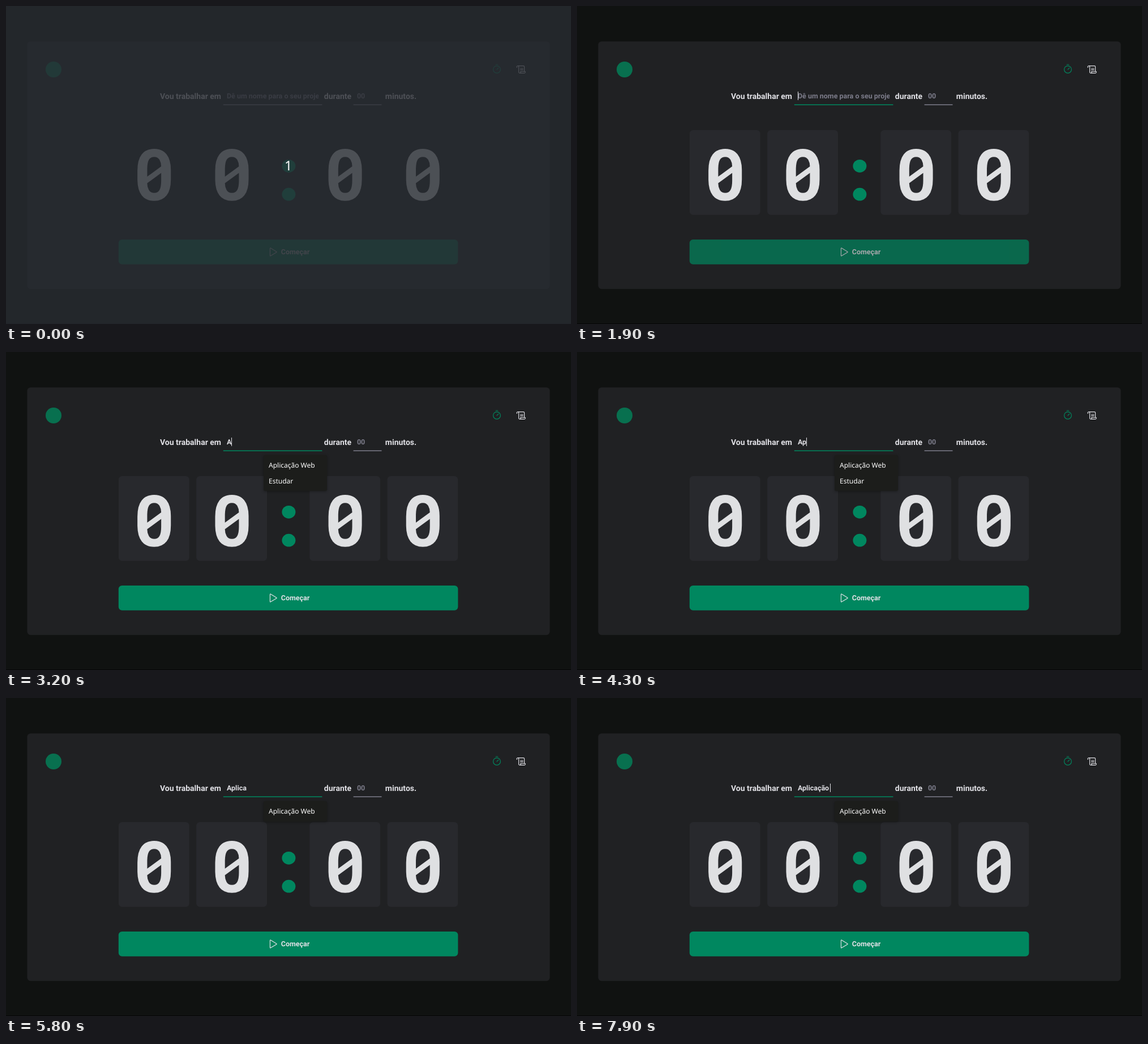
An HTML page that plays this animation: 998 by 561 pixels, repeating every 8 s.

```html
<!DOCTYPE html>
<html lang="pt-BR">
<head>
<meta charset="utf-8">
<title>Timer</title>
<style>
  html, body { margin: 0; width: 100%; height: 100%; overflow: hidden; background: #101211; }
  svg { display: block; width: 998px; height: 561px; }
  text { font: bold 12.48px Roboto, sans-serif; fill: #e1e1e6; white-space: pre; text-rendering: geometricPrecision; }
  .label { font-size: 14.03px; }
  .hint { fill: #7c7c8a; }
  .menu text { font: 12px "Noto Sans", sans-serif; fill: #fff; }
  .menu rect { filter: drop-shadow(0 1px 2px rgba(0, 0, 0, .35)); }
  .icon { fill: none; stroke: #e1e1e6; stroke-width: 16; stroke-linecap: round; stroke-linejoin: round; }
  .green { fill: #00875f; }
  .line { fill: #7c7c8a; }
  .focus { fill: #00875f; }
  .count { font: 23.5px "Noto Sans", sans-serif; fill: #fff; text-anchor: middle; }
</style>
</head>
<body>
<svg viewBox="0 0 998 561">
  <defs>
    <clipPath id="field"><rect x="390" y="145" width="162.2" height="26"/></clipPath>
    <g id="card">
      <rect id="plate" width="124.8" height="149.5" rx="6.2" fill="#28292d"/>
      <path transform="translate(27.8 123.6) scale(.0593 -.0613)" fill="#dfe0e2" fill-rule="evenodd"
        d="M1088 603Q1088 298 962 139T591 -20Q349 -20 222 136T92 583V852Q92 1162 220 1319T589 1476Q831 1476 958 1321T1088 873Z
           M383 678V917Q387 1087 436 1167T589 1247Q700 1247 750 1163T800 973Z
           M800 785V562Q800 383 750 296T591 209Q481 209 431 296T383 489Z"/>
    </g>
  </defs>

  <rect width="998" height="561" fill="#101211"/>
  <rect y="560" width="998" height="1" fill="#050606"/>
  <rect x="37.4" y="62.4" width="923.2" height="436.8" rx="6.2" fill="#202123"/>
  <circle cx="84" cy="112" r="14" fill="#08704f"/>

  <g class="icon" transform="translate(857.65 102.65) scale(.073)" style="stroke:#00875f">
    <circle cx="128" cy="128" r="88"/>
    <path d="M128 128L167.6 88.4M104 8H152"/>
  </g>
  <path class="icon" transform="translate(901 102.65) scale(.073)"
    d="M200 176V64A24 24 0 0 0 176 40H40M104 104H168M104 136H168M22.1 80A24 24 0 1 1 64 64V192A24 24 0 1 0 105.9 176H217.9A24 24 0 0 1 200 216H88"/>

  <text class="label" x="271.9" y="163.6">Vou trabalhar em</text>
  <text class="label" x="561.8" y="163.6">durante</text>
  <text class="label" x="669.8" y="164.4">minutos.</text>
  <g clip-path="url(#field)">
    <text id="hint" class="hint" x="390" y="163">Dê um nome para o seu projeto</text>
    <text id="typed" x="390" y="163"></text>
  </g>
  <rect id="caret" y="151" width="1" height="15" fill="#e1e1e6"/>
  <text class="hint" x="619.9" y="163">00</text>
  <rect id="underline" class="line" x="383.8" y="173.5" width="174.6" height="1.5"/>
  <rect class="line" x="613.6" y="173.5" width="49.9" height="1.5"/>

  <use href="#card" x="198.9" y="219"/>
  <use href="#card" x="336.2" y="219"/>
  <use href="#card" x="536.3" y="219"/>
  <use href="#card" x="673.5" y="219"/>
  <ellipse class="green" cx="499.4" cy="282.3" rx="12" ry="11.4"/>
  <ellipse class="green" cx="499.4" cy="332.2" rx="12" ry="11.4"/>

  <g id="start">
    <rect class="green" x="198.8" y="412" width="599.6" height="43.8" rx="6.2"/>
    <path class="icon" transform="translate(461.2 424.6) scale(.073)"
      d="M72 39.9V216.1A8 8 0 0 0 84.2 222.8L228.2 134.7A7.8 7.8 0 0 0 228.2 121.3L84.2 33.2A8 8 0 0 0 72 39.9Z"/>
    <text x="485.8" y="438">Começar</text>
  </g>

  <g id="menu" class="menu">
    <rect id="menuBox" x="455" y="182" width="112" rx="3" fill="#1c1d1b"/>
    <text x="464" y="204">Aplicação Web</text>
    <text id="second" x="464" y="232">Estudar</text>
  </g>

  <g id="overlay">
    <rect width="998" height="561" fill="#282c33" fill-opacity=".8"/>
    <text class="count" x="498.8" y="289.6">1</text>
  </g>
</svg>
<script>
  const LOOP = 8000;
  const WORD = 'Aplicação ';
  const KEY_TIMES = [3100, 4300, 4600, 4900, 5100, 5200, 6700, 6900, 7100, 7900];
  const CARET_X = [390, 398, 405, 408, 411, 418, 424, 431, 437, 444, 447];
  const CARET_OFF = [[0, 800], [1400, 1900], [2500, 3100], [3900, 4300], [5800, 6400], [7700, 7900]];

  const el = id => document.getElementById(id);
  const show = (id, on) => el(id).setAttribute('visibility', on ? 'visible' : 'hidden');

  function render(t) {
    const count = KEY_TIMES.filter(k => t >= k).length;
    const dimmed = t < 100;
    const filtered = t >= 4400;

    show('overlay', dimmed);
    show('plate', !dimmed);
    el('underline').setAttribute('class', t < 800 ? 'line' : 'focus');

    show('hint', count === 0);
    el('typed').textContent = WORD.slice(0, count);
    el('caret').setAttribute('x', CARET_X[count]);
    show('caret', !CARET_OFF.some(([from, to]) => t >= from && t < to));

    el('start').setAttribute('opacity', count ? 1 : 0.7);
    show('menu', t >= 3200);
    show('second', t >= 3200 && !filtered);
    el('menuBox').setAttribute('height', filtered ? 36 : 63);
  }

  const began = performance.now();
  function tick() {
    render((performance.now() - began) % LOOP);
    requestAnimationFrame(tick);
  }
  tick();
</script>
</body>
</html>
```
